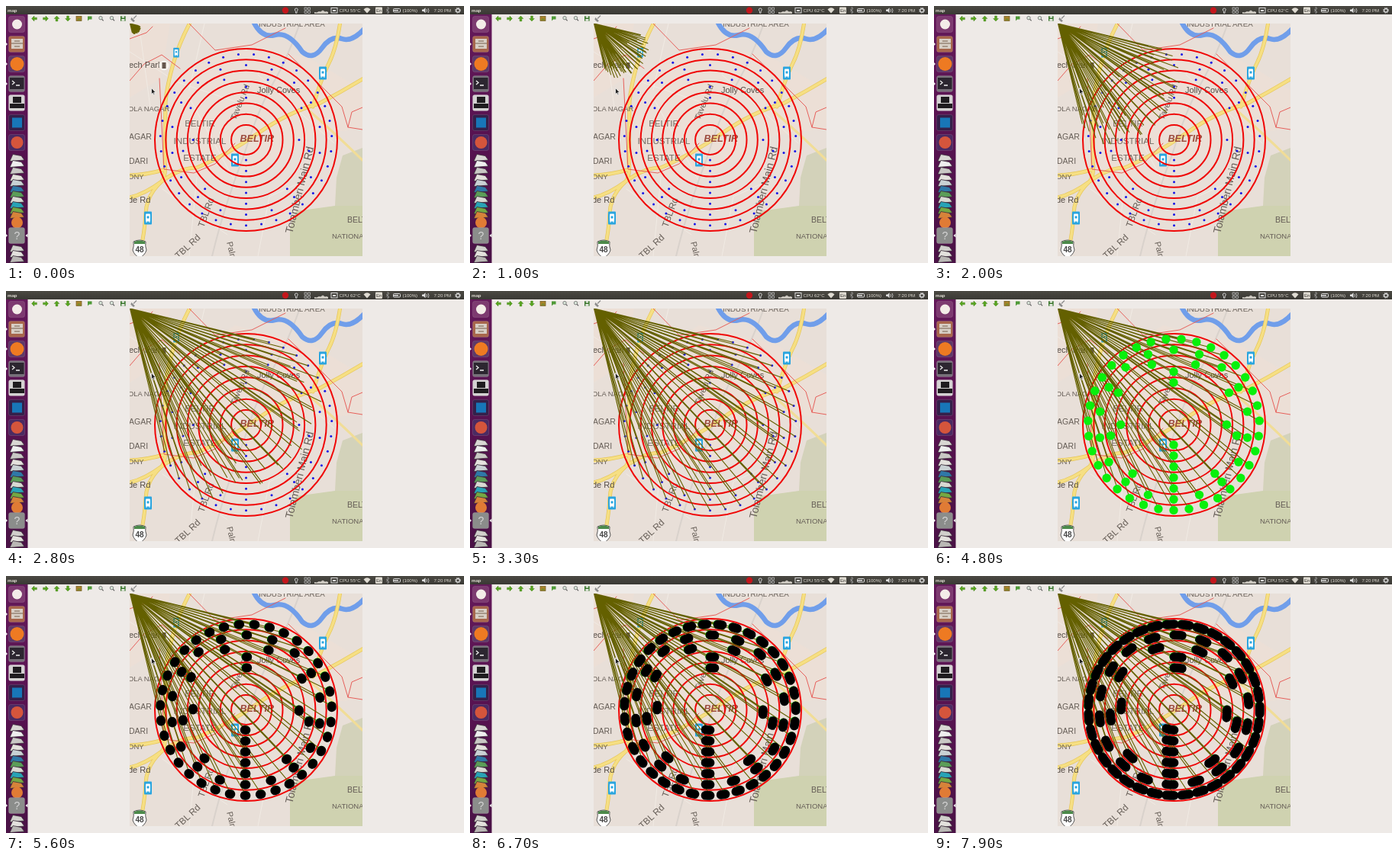
Write an HTML page with a canvas that moves like this. It is 600 px wide and 337 px high and loops after 8000 ms.

```html
<!DOCTYPE html>
<html lang="en">
<head>
<meta charset="utf-8">
<title>map</title>
<style>
  html, body { margin: 0; width: 100%; height: 100%; overflow: hidden; background: #eeeae7; }
  svg, canvas { position: absolute; left: 0; top: 0; width: 600px; height: 337px; }
  text { font-family: "Liberation Sans", Arial, sans-serif; }
  .area { fill: #756c64; text-anchor: middle; font-size: 11.6px; }
  .place { fill: #544c46; font-size: 11px; }
  .road { fill: #665e57; }
  .bar text { fill: #dfdbd2; font-size: 6.1px; }
  .line { fill: none; stroke-linejoin: round; stroke-linecap: round; }
</style>
</head>
<body>
<svg viewBox="0 0 600 337">
  <defs>
    <clipPath id="frame"><rect x="162" y="23" width="305" height="305"/></clipPath>
    <linearGradient id="dock" x2="0" y2="1">
      <stop offset="0" stop-color="#641a5a"/><stop offset=".5" stop-color="#571250"/><stop offset="1" stop-color="#4a1246"/>
    </linearGradient>
    <linearGradient id="panel" x2="0" y2="1">
      <stop offset="0" stop-color="#4b4943"/><stop offset="1" stop-color="#3a3934"/>
    </linearGradient>
    <g id="bus">
      <rect x="-5" y="-8.5" width="10" height="17" rx="1" fill="#2aa5df"/>
      <rect x="-3" y="-5.5" width="6" height="10" rx="1" fill="#fff"/>
      <path d="M-2-3h4v4h-4zM-2 4v2M2 4v2" fill="#2aa5df" stroke="#fff"/>
    </g>
  </defs>

  <g clip-path="url(#frame)">
    <rect x="162" y="23" width="305" height="305" fill="#e8dfd8"/>
    <path d="M162 23H215L203 95 162 120zM222 95L300 45 400 70 467 110V160L400 170 300 230 212 218z" fill="#ecdfd6"/>
    <path d="M467 186L441 196 433 225 431 262 467 268z" fill="#d3d2ba"/>
    <path d="M467 262H431L380 269 372 291V328H467z" fill="#cfd2b0"/>
    <g class="line" stroke="#f1ebe4" stroke-width="1">
      <path d="M162 60L218 96M174 23L190 140M225 100L300 125M260 23L240 110M240 120L300 230M330 90L430 180M205 240L290 300M250 225L240 328M330 328L345 250 400 225"/>
    </g>
    <path class="line" d="M385 23Q368 70 349 103T312 195Q285 265 270 328" stroke="#d9d2cc" stroke-width="2"/>
    <path class="line" d="M323 18Q334 43 352 38T388 60Q402 72 414 55T440 43 472 27" stroke="#709eea" stroke-width="6.5"/>
    <g class="line">
      <g stroke="#e6c65a" stroke-width="5">
        <path id="roads" d="M242 20Q227 48 219 76T209 125L208 205Q210 222 204 230M158 222Q182 222 206 215M158 252Q180 248 204 230T250 212Q290 195 330 167T410 128Q440 112 470 94M204 230Q184 248 183 272T174 332M438 20Q433 55 423 75T402 132"/>
      </g>
      <use href="#roads" stroke="#f6df83" stroke-width="3.6"/>
      <path d="M398 138Q430 166 470 205" stroke="#f1dd97" stroke-width="3"/>
      <path d="M162 43L184 35 192 27M162 98L181 76 204 64 228 82M201 95L207 214 246 219 274 207 300 180M240 23L274 58 322 51 366 29M370 63L408 100 440 132 448 159 467 162M448 159L453 139 467 133" stroke="#e6605b" stroke-width="1"/>
    </g>

    <text x="331" y="27" class="road" font-size="9.8">INDUSTRIAL AREA</text>
    <text x="161" y="81" class="place">ech Park</text>
    <text x="160" y="138" class="road" font-size="9.4">OLA NAGAR</text>
    <text x="161" y="175" class="road" font-size="10.5">AGAR</text>
    <text x="161" y="207" class="road" font-size="10.5">DARI</text>
    <text x="160" y="227" class="road" font-size="9.5">ONY</text>
    <text x="160" y="258" class="place">de Rd</text>
    <text x="254" y="158" class="area">BELTIR</text>
    <text x="254" y="181" class="area">INDUSTRIAL</text>
    <text x="254" y="203" class="area">ESTATE</text>
    <text x="329" y="114" class="place">Jolly Coves</text>
    <text x="306.5" y="177.5" fill="#9c4a3c" font-size="12.6" font-weight="bold" font-style="italic">BELTIR</text>
    <text x="447" y="284" class="road" font-size="10.5">BELTIR</text>
    <text x="427" y="305" class="road" font-size="9.5">NATIONAL</text>
    <g class="road" font-size="11">
      <text transform="translate(301 150) rotate(-68)">Tavelu Rd</text>
      <text transform="translate(375 299) rotate(-76)" font-size="14">Tolamberi Main Rd</text>
      <text transform="translate(259 291) rotate(-70)" font-size="12">TBL Rd</text>
      <text transform="translate(226 332) rotate(-43)" font-size="12">TBL Rd</text>
      <text transform="translate(289 310) rotate(76)">Palm Rd</text>
    </g>
    <circle cx="207" cy="78" r="6.5" fill="#f8f4ee"/>
    <rect x="204.5" y="74" width="5" height="8" fill="#66574d"/>
    <use href="#bus" x="300" y="202"/><use href="#bus" x="415" y="88"/><use href="#bus" x="186" y="278"/>
    <g transform="translate(223 61) scale(.75)"><use href="#bus"/></g>
    <path d="M167 309Q175 305 183 309 182 315 184 320 182 327 175 330 168 327 166 320 168 315 167 309z" fill="#fff" stroke="#555"/>
    <path d="M168 309Q175 306 182 309V312H168z" fill="#4c8a4a"/>
    <text x="175" y="323" text-anchor="middle" font-size="10" font-weight="bold" fill="#444">48</text>
  </g>

  <rect y="11" width="28.5" height="326" fill="url(#dock)"/>
  <g id="launcher"></g>
  <g id="tools"></g>

  <rect width="600" height="11" fill="url(#panel)"/>
  <g class="bar">
    <text x="2" y="8" font-weight="bold">map</text>
    <circle cx="366" cy="5.8" r="4.2" fill="#c4161c"/>
    <path d="M378.3 5a2 2 0 1 1 4 0l-1.2 2.2v2h-1.6v-2z" fill="none" stroke="#ddd" stroke-width=".9"/>
    <path d="M391 2h3v3h-3zM395.5 2h3v3h-3zM391 6.5h3v3h-3zM395.5 6.5h3v3h-3z" fill="none" stroke="#bbb" stroke-width=".8"/>
    <path d="M404 10V8l3 .5 3-1.5 2 .5 3-2 3 2 2-.5 2 1v2z" fill="#cbc7bf"/>
    <rect x="426" y="2.5" width="8" height="6.5" fill="none" stroke="#ddd"/><path d="M428 5h4v2h-4z" fill="#ddd"/>
    <text id="cpu" x="436.5" y="8.1">CPU 55°C</text>
    <path d="M468.5 4.5Q473 0 477.5 4.5L473 9.5z" fill="#dfdbd2"/>
    <rect x="484" y="1.5" width="9" height="8.5" rx="1" fill="#dfdbd2"/>
    <text x="485" y="8" style="fill:#3d3b37">En</text>
    <path d="M498 4l4 4-2 1.7V1.5l2 1.7-4 4" fill="none" stroke="#aaa" stroke-width=".7"/>
    <rect x="507.5" y="3.5" width="9" height="4.5" rx="1" fill="none" stroke="#ddd"/><path d="M508 5h6v1.5h-6z" fill="#ddd"/>
    <text x="519.5" y="8.1">(100%)</text>
    <path d="M545 4.5h2l2.5-2.2v7L547 7h-2z" fill="#ddd"/>
    <path d="M551 4q1 2 0 4M553 3q2 3 0 6" fill="none" stroke="#ddd" stroke-width=".8"/>
    <text x="560.5" y="8.1">7:20 PM</text>
    <circle cx="592" cy="5.8" r="2.3" fill="none" stroke="#ddd" stroke-width="1.3"/>
    <circle cx="592" cy="5.8" r="3.4" fill="none" stroke="#ddd" stroke-dasharray="1.4 1.3"/>
  </g>
</svg>
<canvas id="view"></canvas>

<script>
const $ = id => document.getElementById(id);
const tile = (y, fill) => `<rect x="3.5" y="${y - 10.5}" width="21" height="21" rx="2.5" fill="${fill}" stroke="#c9a9c4" stroke-opacity=".3" stroke-width=".6"/>`;
const dot = (y, r, fill) => `<circle cx="14.5" cy="${y}" r="${r}" fill="${fill}"/>`;
const slab = (y, fill) => `<path d="M9 ${y - 4.5}L20 ${y - 2.5} 24 ${y + 3} 5 ${y + 4.5}z" fill="${fill}" stroke="#3c2f3b" stroke-width=".8"/>`;

function launcher() {
  const stack = [[199, '#d9d7d3'], [207, '#eee'], [216, '#c9c8c5'], [225, '#e4e1dd'], [232, '#c9d1d4'],
    [240, '#2f78a8'], [247, '#5b9d58'], [254, '#d8d8d2'], [261, '#28a3b6'], [268, '#74a843'], [274, '#d6833a']];
  const pips = [50, 76, 102, 301].map(y => `<path d="M0 ${y - 2}L2 ${y} 0 ${y + 2}z" fill="#eee"/>`).join('');
  return tile(24, '#7d3a70') + dot(24, 6.5, '#f3ece8')
    + tile(50, '#a8674c') + '<path d="M7 43h15v13H7z" fill="#d8cfc5"/><path d="M7 49h15M11 46h7M11 53h7" stroke="#77604f"/>'
    + tile(76, '#5d3a68') + dot(76, 9, '#ee7a22')
    + tile(102, '#77727a') + '<rect x="5" y="94" width="18.5" height="15" fill="#2c2630"/><path d="M8 98l3 2.5-3 2.5M13 104h5" fill="none" stroke="#eee" stroke-width="1.3"/>'
    + tile(127, '#d4d2d2') + '<path d="M9 119h11v8H9zM5 128h19v6H5z" fill="#1f1c1f"/>'
    + tile(153, '#34204a') + '<rect x="8" y="146.5" width="13" height="13" fill="#1876b8"/>'
    + tile(179, '#4a2a62') + dot(179, 8, '#d5553c')
    + stack.map(s => slab(...s)).join('') + dot(284, 7.5, '#e07b35')
    + tile(301, '#8b8d8b') + '<text x="14.5" y="306" text-anchor="middle" font-size="14" fill="#d6d6d6">?</text>'
    + slab(318, '#d0cfcb') + slab(325, '#e3e1dd') + slab(332, '#bab8b5')
    + pips + '<path d="M28.5 298.5l-3 2.5 3 2.5z" fill="#eee"/>';
}

function tools() {
  const arrow = (x, turn) => `<path transform="translate(${x} 16.5) rotate(${turn}) scale(.85)" d="M-4 0L0-4V-1.6H4V1.6H0V4z" fill="#58a51f" stroke="#3b7c12" stroke-width=".5"/>`;
  const lens = x => `<circle cx="${x}" cy="15.7" r="2.2" fill="#dce8dc" stroke="#666" stroke-width=".8"/><path d="M${x + 1.6} 17.3l2 2" stroke="#555" stroke-width="1.2"/>`;
  return arrow(37, 0) + arrow(52, 180) + arrow(66.5, 90) + arrow(81, -90)
    + '<rect x="92" y="13.5" width="7" height="6" fill="#a8842c" stroke="#6e5a20" stroke-width=".7"/><path d="M93 18.5l2.5-2.5 3 2.5z" fill="#6d8b2d"/>'
    + '<path d="M107 13.5h5.5v4H109L107 19.5z" fill="#4f9a38"/>' + lens(124) + lens(138.5)
    + '<rect x="150" y="13.3" width="6.6" height="6.4" fill="#39762b"/><path d="M151.7 13.3H155v2.2h-3.3zM151.3 17H155.400v2.7H151.300z" fill="#e4e8df"/>'
    + '<path d="M171 12.5l-4 4M164.500 16l3.500 3.500-1 .7-3-2.600z" stroke="#888" stroke-width="1.1" fill="#aaa"/>';
}

$('launcher').innerHTML = launcher();
$('tools').innerHTML = tools();

const LOOP = 8000, STEP = 100, SCALE = window.devicePixelRatio || 1;
const HOME = { x: 162.5, y: 23 }, HUB = { x: 314.5, y: 175.5 };
const GAP = 14.3, OUTER = 119.5, COUNTS = [35, 18, 9, 4, 2, 1, 1];

let seed = 7;
const rand = () => (seed = seed * 16807 % 2147483647) / 2147483647;

// Drones share each lane evenly, counted from the lowest point.
const drones = COUNTS.flatMap((n, lane) => Array.from({ length: n }, (_, i) => {
  const r = OUTER - GAP * (lane + .5), a = Math.PI / 2 - i * 2 * Math.PI / n;
  const x = HUB.x + r * Math.cos(a), y = HUB.y + r * Math.sin(a);
  const dist = Math.hypot(x - HOME.x, y - HOME.y);
  return { r, a, x, y, pace: Math.sqrt(300 / dist) * (.94 + .12 * rand()), lag: .4 * rand() };
}));

const canvas = $('view'), ctx = canvas.getContext('2d');
canvas.width = 600 * SCALE;
canvas.height = 337 * SCALE;
ctx.scale(SCALE, SCALE);

function disc(x, y, r, fill) {
  ctx.fillStyle = fill;
  ctx.beginPath();
  ctx.arc(x, y, r, 0, 2 * Math.PI);
  ctx.fill();
}

function rings() {
  ctx.strokeStyle = '#f00606';
  ctx.lineWidth = 2;
  for (let i = 0; i < 8; i++) {
    ctx.beginPath();
    ctx.arc(HUB.x, HUB.y, OUTER - i * GAP, 0, 2 * Math.PI);
    ctx.stroke();
  }
}

// Nearer drones cover a larger share of their way at any time.
function trails(t) {
  const reach = .05 + .152 * t + .054 * t * t;
  ctx.strokeStyle = '#646000';
  ctx.lineWidth = 1.1;
  ctx.lineCap = 'butt';
  ctx.beginPath();
  for (const d of drones) {
    const k = Math.min(1, reach * d.pace);
    ctx.moveTo(HOME.x, HOME.y);
    ctx.lineTo(HOME.x + (d.x - HOME.x) * k, HOME.y + (d.y - HOME.y) * k);
  }
  ctx.stroke();
}

function orbit(d, t) {
  const run = Math.max(.4, 3.7 * (t - 5.1));
  ctx.strokeStyle = '#000';
  ctx.lineWidth = 11.8;
  ctx.lineCap = 'round';
  ctx.beginPath();
  ctx.arc(HUB.x, HUB.y, d.r, d.a, d.a + run / d.r);
  ctx.stroke();
}

function cursor() {
  ctx.fillStyle = '#222';
  ctx.strokeStyle = '#fff';
  ctx.lineWidth = .7;
  const arrow = new Path2D('M190.5 107.5v8.2l1.9-1.7 1.4 2.8 1.2-.6-1.3-2.7h2.4z');
  ctx.fill(arrow);
  ctx.stroke(arrow);
}

function draw(ms) {
  const t = ms / 1000;
  ctx.clearRect(0, 0, 600, 337);
  rings();
  for (const d of drones) disc(d.x, d.y, 1.5, '#1414e6');
  ctx.save();
  ctx.beginPath();
  ctx.rect(162, 23, 305, 305);
  ctx.clip();
  trails(t);
  ctx.restore();
  for (const d of drones) if (t > 3.3 + d.lag) disc(d.x - .5, d.y - .3, 5.7, '#08f00c');
  for (const d of drones) if (t > 4.9 + d.lag) orbit(d, t);
  cursor();
  $('cpu').textContent = ms >= 500 && ms < 4600 ? 'CPU 62°C' : 'CPU 55°C';
}

const start = performance.now();
function tick() {
  const ms = (performance.now() - start) % LOOP;
  draw(Math.floor(ms / STEP) * STEP);
  requestAnimationFrame(tick);
}
tick();
</script>
</body>
</html>
```
